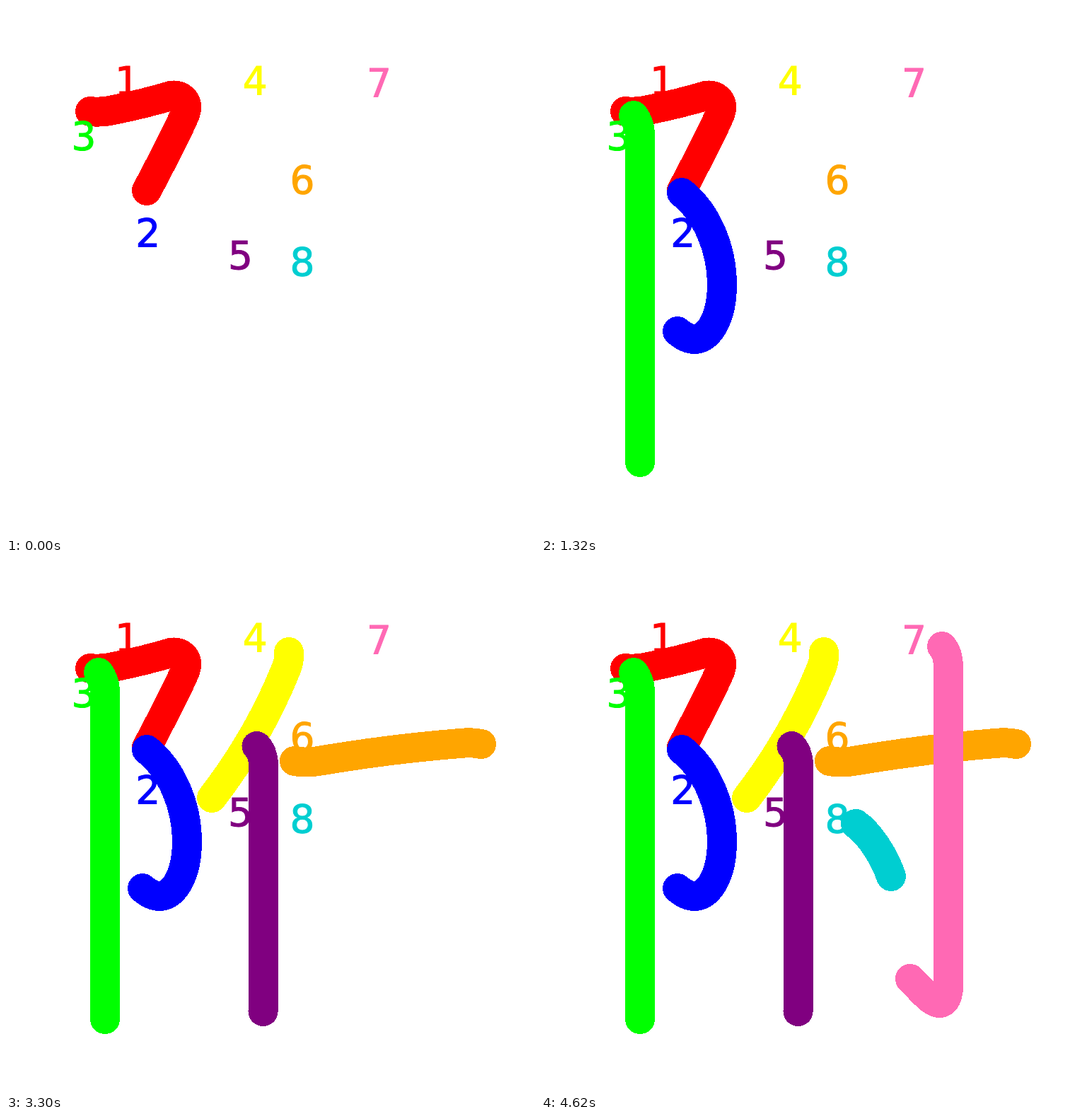
An HTML page for the animation above (5280 ms loop, 748 px wide and 748 px high).

```html
<!DOCTYPE html>
<html lang="en">
<head>
<meta charset="utf-8">
<title>Stroke order</title>
<style>
  html, body { margin: 0; height: 100%; overflow: hidden; background: #fff; }
  svg { display: block; width: 100%; height: 100%; }
  path { fill: none; stroke-width: 42; stroke-linecap: round; stroke-linejoin: round; shape-rendering: crispEdges; }
  text { font: 55px "DejaVu Sans", sans-serif; text-anchor: middle; stroke-width: 1; }
</style>
</head>
<body>
<svg viewBox="0 0 748 748"></svg>
<script>
const STEP = 660;
// colour, label centre, label baseline, path
const strokes = [
  ['#f00', 171.5, 125, 'M119 149Q135 151 152 147Q196 138 233 127C247 124 259 135 254 150Q249 166 199 261'],
  ['#00f', 200.8, 340, 'M199 264C235 292 256 345 256 394C256 440 238 471 217 471Q206 471 193 460'],
  ['#0f0', 110, 203, 'M131 155C137 163 140 171 140 183V645'],
  ['#ff0', 352.2, 125, 'M400 126Q401 138 396 150C375 202 345 262 291 332'],
  ['#800080', 331.5, 371.5, 'M354.5 259Q364 269 364 287V626Q364 630 363.5 634'],
  ['#ffa500', 419, 264.5, 'M408 280Q423 283.5 448 279Q550 262 647 254.6Q660 253.5 672 256'],
  ['#ff69b4', 527.6, 127.5, 'M567 118Q576 128 576 148V598C576 618 568 622 563 622C553 622 541 607 522 588'],
  ['#00ced1', 419, 381, 'M445 369C464 382 485 414 495 443']
];

const svg = document.querySelector('svg');
function add(tag, attrs) {
  const node = document.createElementNS(svg.namespaceURI, tag);
  for (const key in attrs) node.setAttribute(key, attrs[key]);
  return svg.appendChild(node);
}

const paths = strokes.map(([stroke, , , d]) => add('path', { d, stroke }));
strokes.forEach(([color, x, y], i) => {
  add('text', { x, y, fill: color, stroke: color }).textContent = i + 1;
});

const start = performance.now();
function draw() {
  const step = Math.floor((performance.now() - start) / STEP) % strokes.length;
  paths.forEach((path, i) => path.style.display = i <= step ? '' : 'none');
  requestAnimationFrame(draw);
}
draw();
</script>
</body>
</html>
```
